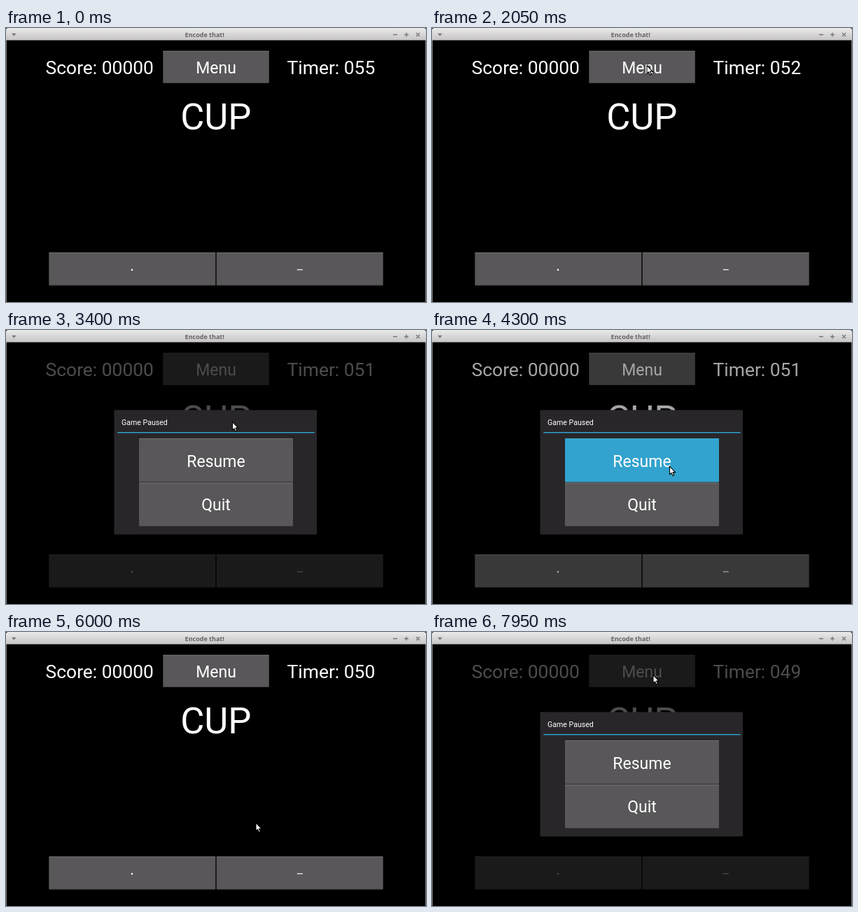
Animation, 600 px wide and 392 px high, one loop 8000 ms. Source, as an HTML page:

```html
<!DOCTYPE html>
<html lang="en">
<head>
<meta charset="utf-8">
<title>Encode that!</title>
<style>
  html, body { margin: 0; width: 100%; height: 100%; overflow: hidden; background: #000; }
  svg { display: block; font-family: Roboto, sans-serif; fill: #fff; }
  .title { font: bold 9px "Open Sans", "Noto Sans", sans-serif; fill: #666462; }
  .label { font-size: 26.4px; }
  .caption { font-size: 23px; text-anchor: middle; }
  .word { font-size: 52.5px; text-anchor: middle; }
  .face { fill: #595759; }
  .shine { fill: #7c7a7c; }
  .shade { fill: #454345; }
  .down .face { fill: #32a3ce; }
  .down .shine { fill: #3fb0da; }
  .down .shade { fill: #2c8fb5; }
</style>
</head>
<body>
<svg width="600" height="392" viewBox="0 0 600 392">
  <defs>
    <linearGradient id="bar" x2="0" y2="1">
      <stop stop-color="#ebeaea"/>
      <stop offset="1" stop-color="#c6c4c4"/>
    </linearGradient>
  </defs>
  <rect width="600" height="392" fill="#000"/>

  <g id="game">
    <text class="label" x="56.6" y="66">Score: 00000</text>
    <text class="label" x="401.6" y="66" id="timer"></text>
    <text class="word" x="299.8" y="144.8">CUP</text>
  </g>

  <rect id="dim" y="18" width="600" height="374" fill="#000"/>

  <g id="popup">
    <rect x="154.5" y="114.5" width="289.5" height="178" rx="1" fill="#282629"/>
    <text x="165" y="136" font-size="10.6">Game Paused</text>
    <rect x="159.3" y="146" width="281.4" height="1.4" fill="#2fa7d4"/>
  </g>

  <path d="M.5 17V392M599.5 17V392" stroke="#7d7b7a"/>
  <path d="M0 17.6V3Q0 0 3 0H597Q600 0 600 3V17.6Z" fill="url(#bar)"/>
  <text class="title" x="255.6" y="13">Encode that!</text>
  <path d="M8 7.8h6.6l-3.3 3.6z" fill="#777574"/>
  <path d="M553 9.5h6M569 9.5h6M572 6.5v6M586 7l5 5M591 7l-5 5" stroke="#777574" stroke-width="1.3"/>

  <path id="cursor" d="M0 0V11.6L2.6 9.3L4.5 13.6L6.4 12.8L4.6 8.6H8.2Z" stroke="#000" stroke-width="1.1"/>
</svg>
<script>
const LOOP = 8000, STEP = 50;
const $ = id => document.getElementById(id);

function addButton(parent, x, y, w, h, content) {
  const group = document.createElementNS('http://www.w3.org/2000/svg', 'g');
  group.innerHTML = `
    <rect class="face" x="${x}" y="${y}" width="${w}" height="${h}" rx=".8"/>
    <rect class="shine" x="${x}" y="${y}" width="${w}" height=".8"/>
    <rect class="shade" x="${x}" y="${y + h - .7}" width="${w}" height=".7"/>
    ${content}`;
  $(parent).append(group);
  return group;
}
const caption = (text, x, y) => `<text class="caption" x="${x}" y="${y}">${text}</text>`;

const menu = addButton('game', 224.3, 32.8, 151.5, 46, caption('Menu', 300, 64.6));
addButton('game', 61.3, 321.3, 238, 47, '<rect x="178.8" y="344.8" width="2.3" height="2.3"/>');
addButton('game', 300.7, 321.3, 238, 47, '<rect x="415.8" y="345.2" width="8" height="1.2"/>');
const resume = addButton('popup', 190, 155.2, 220, 62.2, caption('Resume', 300, 195.8));
addButton('popup', 190, 218.6, 220, 62.2, caption('Quit', 300, 258.3));

// Cursor stops: time, x, y
const path = [
  [800, 300, 386], [1100, 299, 250], [1600, 302, 77], [1750, 307, 53.5],
  [2800, 307, 53.5], [3400, 323.5, 131.5], [3650, 332, 176], [3850, 339.5, 195],
  [4450, 339.5, 195], [4800, 357, 273], [6850, 357, 273],
  [7150, 338, 160], [7400, 319, 52], [7800, 319, 52], [7950, 316, 61.5], [LOOP, 316, 61.5]
];
const ticks = [50, 1050, 2050, 3050, 6000, 7000];

const ramp = (t, start, length = 100) => Math.min(1, Math.max(0, (t - start) / length));
const within = (t, from, to) => t >= from && t < to;

function moveCursor(t) {
  $('cursor').style.display = t < path[0][0] ? 'none' : '';
  const i = path.findIndex(stop => stop[0] > t);
  if (i < 1) return;
  const [t0, x0, y0] = path[i - 1], [t1, x1, y1] = path[i];
  const k = (t - t0) / (t1 - t0);
  $('cursor').setAttribute('transform', `translate(${x0 + (x1 - x0) * k} ${y0 + (y1 - y0) * k})`);
}

function draw(now) {
  const t = Math.floor(now % LOOP / STEP) * STEP;
  const seconds = 55 - ticks.filter(tick => tick <= t).length;
  $('timer').textContent = 'Timer: ' + String(seconds).padStart(3, '0');

  const dim = ramp(t, 2150) - ramp(t, 4250) + ramp(t, 7550);
  $('dim').setAttribute('opacity', .7 * dim);
  $('popup').style.display = dim > 0 ? '' : 'none';
  menu.classList.toggle('down', within(t, 2150, 2250) || within(t, 7550, 7650));
  resume.classList.toggle('down', within(t, 4250, 4350));

  moveCursor(t);
  requestAnimationFrame(draw);
}
requestAnimationFrame(draw);
</script>
</body>
</html>
```
